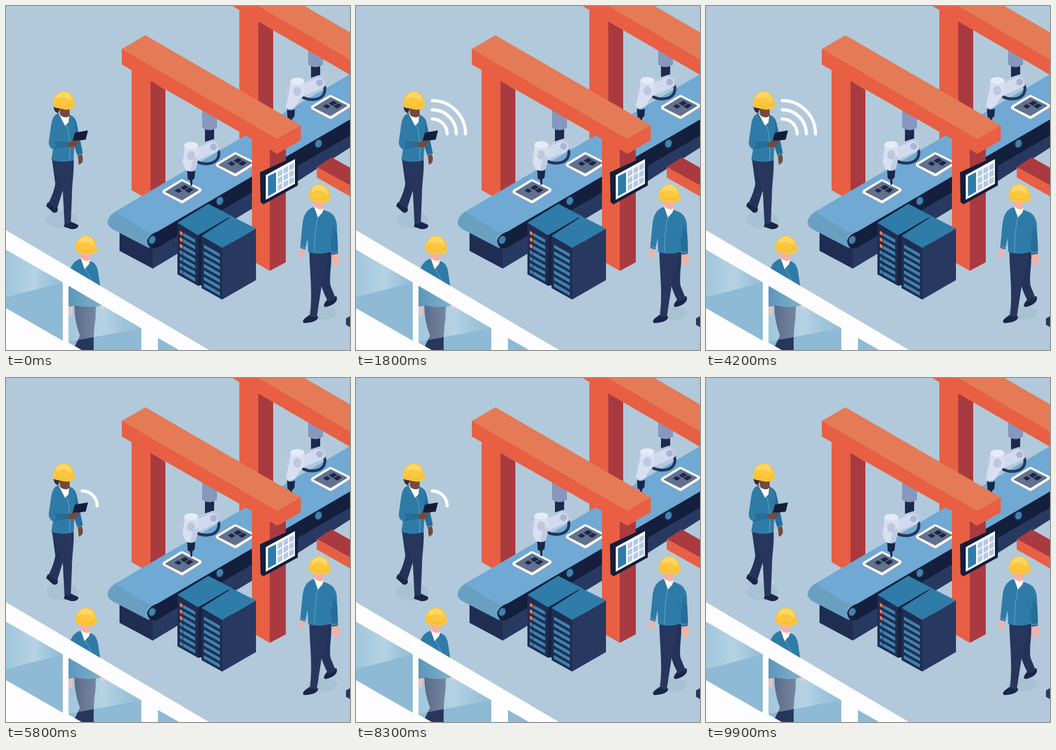
Animation of 600 by 600 pixels, one loop 10000 ms. Source, as an HTML page:

```html
<!DOCTYPE html>
<html lang="en">
<head>
<meta charset="utf-8">
<title>Smart factory</title>
<style>
  html, body { margin: 0; width: 100%; height: 100%; overflow: hidden; background: #b1c9da; }
  svg { display: block; width: 100vw; height: 100vh; }
</style>
</head>
<body>
<svg viewBox="0 0 600 600" xmlns="http://www.w3.org/2000/svg">
  <defs>
    <linearGradient id="shine">
      <stop offset="0" stop-color="#dcebf3" stop-opacity=".25"/>
      <stop offset=".5" stop-color="#dcebf3" stop-opacity=".5"/>
      <stop offset="1" stop-color="#a9cce0" stop-opacity=".2"/>
    </linearGradient>

    <g id="helmet">
      <path fill="#fdc63c" d="M528 333C528 318 537 311 547 311C558 311 564 319 564 328L567 336C563 342 553 344 546 342C540 340 533 341 528 337Z"/>
      <path fill="#ffd766" d="M532 325C535 315 541 312 548 312C557 313 561 321 560 329C554 322 544 319 532 325Z"/>
      <path fill="none" stroke="#f3b32f" stroke-width="1.2" d="M530 335Q538 335 546 338Q555 339 564 332"/>
    </g>

    <g id="head">
      <path fill="#fff" d="M537 349L554 352L552 360L544 369Z"/>
      <path fill="#f4b0a3" d="M536 337L554 339L554 352C551 356 543 356 537 349Z"/>
      <use href="#helmet"/>
    </g>

    <g id="board">
      <path fill="#8d9dbc" stroke="#8d9dbc" stroke-width="8" stroke-linejoin="round" d="M-30 2L0-16L30-1L0 18Z"/>
      <path fill="#f6f8fe" stroke="#f6f8fe" stroke-width="8" stroke-linejoin="round" d="M-30 0L0-18L30-3L0 16Z"/>
      <path fill="#61718f" stroke="#61718f" stroke-width="2" stroke-linejoin="round" d="M-28 0L0-17L28-3L0 14Z"/>
      <path fill="#1b2747" d="M-3-7L5-12L12-8L4-3ZM5-2L13-7L20-4L12 2ZM-13-2L-7-6L0-2L-6 2Z"/>
    </g>

    <g id="arm">
      <path fill="none" stroke="#25365c" stroke-width="5" stroke-linecap="round" d="M369 247C375 262 369 273 353 275Q343 276 334 272"/>
      <path fill="none" stroke="#bcc7e0" stroke-width="23" stroke-linecap="round" d="M312 261L363 244"/>
      <path fill="none" stroke="#d2daed" stroke-width="20" stroke-linecap="round" d="M323 263L360 247"/>
      <circle cx="362" cy="246" r="6" fill="#aab6d4"/>
    </g>

    <g id="joint">
      <path fill="#d8dff0" d="M311 243V252L308 274L313 286Q322 291 331 285L336 264L335 243Z"/>
      <path fill="#c3cce3" d="M326 267L336 262L331 285Q327 288 321 288Z"/>
    </g>

    <g id="cap">
      <ellipse cx="323" cy="243" rx="12" ry="6" fill="#e6ebf7"/>
      <ellipse cx="323" cy="261" rx="7" ry="8" fill="#bcc7e0"/>
    </g>

    <path id="gripper" fill="#1a2648" d="M316 287Q323 291 330 287L329 300L325 304V312L322 314L321 304L317 302Z"/>

    <g id="hanger">
      <path fill="#1d2a4e" d="M347 205H363V242H347Z"/>
      <path fill="#8698bd" d="M342 172H368V212Q355 221 342 212Z"/>
    </g>
  </defs>

  <rect width="600" height="600" fill="#b1c9da"/>

  <!-- rear gantry post -->
  <path fill="#e85f43" d="M407 0H440V240H407Z"/>
  <path fill="#a93a40" d="M440 20L466 35V240H440Z"/>

  <!-- front gantry, left post -->
  <path fill="#e85f43" d="M219 105L252 125V340L219 321Z"/>
  <path fill="#a93a40" d="M252 130L278 146V340H252Z"/>

  <!-- conveyor -->
  <path fill="#1f2d52" d="M198 392L256 424V458L198 427Z"/>
  <path fill="#273960" d="M256 418L600 215V247L508 306L256 458Z"/>
  <path fill="#141f3d" d="M262 394L600 197V226L263 422Q248 427 245 414Q246 400 262 394Z"/>
  <path fill="#69a0c2" d="M195 356Q178 365 177 378Q178 385 187 390L243 419Q247 422 252 422Q243 412 248 402Q254 396 265 393Z"/>
  <path fill="#70a9d3" d="M195 356L600 119V198L265 393Q252 397 242 391L192 360Z"/>
  <g id="wheels"></g>
  <use href="#board" x="307" y="324"/>
  <use href="#board" x="400" y="277"/>
  <use href="#board" x="566" y="177"/>

  <!-- robots -->
  <use href="#hanger" x="185" y="-110"/>
  <g id="rearArm">
    <use href="#gripper" x="174" y="-107"/>
    <g transform="translate(185 -112)">
      <use href="#arm"/>
      <path fill="#d8dff0" d="M311 243L310 256L303 288Q311 295 319 289L335 264V243Z"/>
      <use href="#cap"/>
    </g>
  </g>
  <use href="#hanger"/>
  <g id="frontArm">
    <use href="#gripper"/><use href="#arm"/><use href="#joint"/><use href="#cap"/>
  </g>

  <!-- rear gantry beam -->
  <path fill="#e85f43" d="M390-30L600 93V120L440 27L407 7L390-3Z"/>
  <path fill="#e57a56" d="M388-30L440-47L600 46V93L440 0Z"/>

  <!-- front gantry, beam and right post -->
  <path fill="#a93a40" d="M460 245L488 235V447L460 462Z"/>
  <path fill="#e85f43" d="M202 74L473 231L514 208V234L473 258L460 250V462L429 444V232L202 102Z"/>
  <path fill="#e57a56" d="M202 75L243 51L514 208L473 232Z"/>

  <!-- servers -->
  <path fill="#17223f" d="M334 399L395 367V452L334 488Z"/>
  <path fill="#1f2d52" d="M299 378L335 399V488L299 468Z"/>
  <path fill="#2f7ca9" d="M299 378L353 345L395 367L335 400Z"/>
  <path fill="#17223f" d="M335 400L388 369L395 371L341 402V487L335 488Z"/>
  <path fill="#273960" d="M377 422L436 388V478L377 512Z"/>
  <path fill="#1f2d52" d="M341 401L377 422V512L341 492Z"/>
  <path fill="#2f7ca9" d="M341 401L394 367L436 388L377 422Z"/>
  <g id="slots"></g>

  <!-- control panel -->
  <path fill="#141e3b" d="M443 290L504 262L509 264V313L449 346L444 342Z"/>
  <path fill="#f7faff" d="M453 295L504 267V310L453 338Z"/>
  <path fill="#2f7ca9" d="M457 297L471 290V324L457 332Z"/>
  <g id="tiles" fill="#b3c9e2"></g>

  <!-- right edge -->
  <path fill="#a93a40" d="M542 281L568 264L600 282V313Z"/>
  <path fill="#e85f43" d="M542 281L600 313V332L542 299Z"/>
  <path fill="#273960" d="M593 545L600 541V560L593 556Z"/>

  <!-- worker with tablet -->
  <ellipse cx="98" cy="373" rx="28" ry="15" fill="#a8c2d3"/>
  <path fill="#1a2547" d="M73 342L90 352C92 358 88 362 82 360L70 349ZM103 376L113 376L126 382C127 387 121 390 113 389L101 385Z"/>
  <path fill="#243359" d="M80 266H106L104 306Q97 328 89 354L74 344Q84 324 86 310Z"/>
  <path fill="#27365d" d="M80 266L118 268C119 290 115 310 115 330L113 378Q108 382 102 378L99 322Q90 300 80 266Z"/>
  <path fill="#75493d" d="M125 258L132 258Q136 268 132 274L127 277Z"/>
  <path fill="#276d99" d="M112 190Q122 194 124 208L134 257L125 262L114 230Z"/>
  <path fill="#2f7ba8" d="M91 187L112 190Q119 194 121 206L118 269Q98 275 79 268L82 250Q73 246 75 234L79 206Q81 191 91 187Z"/>
  <path fill="#276d99" d="M83 236L109 237L110 245L82 250Q92 244 83 236Z"/>
  <path fill="#fff" d="M92 188L110 192L109 203L103 209Z"/>
  <path fill="#3b2a33" d="M83 170L95 174L91 187Q82 185 83 170Z"/>
  <path fill="#75493d" d="M92 174L111 176L111 190Q107 198 95 191Z"/>
  <use href="#helmet" x="-446" y="-162"/>
  <path fill="none" stroke="#6aa9cb" d="M106 208Q113 230 111 270M125 260L134 257"/>
  <path fill="#141d38" d="M120 221L143 217L139 233L116 236Z"/>
  <path fill="#75493d" d="M108 238L122 234Q129 236 125 240L119 246L109 246Z"/>

  <g id="waves" fill="none" stroke="#fff" stroke-width="5.5" stroke-linecap="round"></g>

  <!-- worker on the right -->
  <ellipse cx="552" cy="535" rx="26" ry="12" fill="#a8c2d3"/>
  <path fill="#1a2547" d="M561 511L576 506C580 512 575 521 558 525C552 524 554 520 561 511ZM528 539L544 541C546 548 535 553 520 553C515 550 520 545 528 540Z"/>
  <path fill="#243359" d="M546 429H567C569 450 563 470 566 488L575 510L562 516C552 498 547 480 545 465Z"/>
  <path fill="#27365d" d="M529 428L563 430C560 455 552 475 549 498L542 543L530 541C535 500 530 470 529 428Z"/>
  <path fill="#f4b0a3" d="M513 421L521 424C520 432 518 438 515 439C511 435 511 428 513 421ZM570 432L579 432C582 440 581 448 577 453C572 452 571 446 567 444Z"/>
  <path fill="#2f7ba8" d="M535 351L558 357C570 361 575 368 577 380L579 432L568 434L567 428C555 433 540 433 527 429L526 405L522 425L513 422L517 382C519 364 524 356 535 351Z"/>
  <path fill="#276d99" d="M560 382L566 405L568 434L579 432L578 399L571 380L568 408Z"/>
  <path fill="none" stroke="#6aa9cb" d="M544 368Q538 394 538 430M514 419L523 422M568 430L579 429"/>
  <use href="#head"/>

  <!-- worker behind the railing -->
  <path fill="#8ebad5" d="M0 424L100 482V584L0 527ZM108 487L236 562V600H108ZM265 579L302 600H265Z"/>
  <path fill="#f4b0a3" d="M109 520H117L115 541L110 540ZM164 520L171 523V530L164 526Z"/>
  <path fill="#27365d" d="M119 518H157L156 545Q152 570 153 600H117L129 575Q119 550 119 518Z"/>
  <path fill="#2f7ba8" d="M129 441L150 446Q159 450 161 466L166 500L167 522L158 524Q138 527 119 522L116 524H108L110 470Q112 447 129 441Z"/>
  <path fill="none" stroke="#6aa9cb" d="M138 458Q150 475 152 495"/>
  <use href="#head" x="-407" y="90"/>
  <path fill="url(#shine)" d="M0 424L100 482L0 508Z"/>
  <path fill="url(#shine)" d="M108 487L236 562L108 586Z"/>
  <path fill="#fdfdff" fill-rule="evenodd" d="M0 391L354 600H302L265 579V600H236V562L109 488V587L132 600H0V527L99 584V482L0 425Z"/>
</svg>
<script>
  const byId = id => document.getElementById(id);

  const make = (parent, tag, attrs) => {
    const node = document.createElementNS('http://www.w3.org/2000/svg', tag);
    for (const key in attrs) node.setAttribute(key, attrs[key]);
    return byId(parent).appendChild(node);
  };

  // Parallelogram with vertical sides; slope tilts its long edges.
  const slab = (parent, x, y, w, h, slope, fill) => {
    const attrs = { d: `M${x} ${y}l${w} ${w * slope}v${h}l${-w} ${-w * slope}z` };
    if (fill) attrs.fill = fill;
    return make(parent, 'path', attrs);
  };

  for (const [cx, cy] of [[255, 408], [373, 340], [545, 240]]) {
    make('wheels', 'ellipse', {
      cx, cy, rx: 6.5, ry: 8, fill: '#3f83ae', stroke: '#17284c',
      'stroke-width': 2, transform: `rotate(24 ${cx} ${cy})`
    });
  }

  for (let row = 0; row < 7; row++) {
    const y = 392 + row * 11.2;
    slab('slots', 303, y, 5, 6, 0.57, row < 3 ? '#e57a56' : '#3e83ae');
    slab('slots', 309, y + 3.4, 21, 6, 0.57, '#3e83ae');
    slab('slots', 345, y + 24, 28, 6, 0.57, '#3e83ae');
  }

  for (let i = 0; i < 9; i++) {
    const col = i % 3, row = Math.floor(i / 3);
    slab('tiles', 474 + col * 10, 289 - col * 5.5 + row * 12, 8, 9.5, -0.55);
  }

  const LOOP = 10000, LIFT = 2000, SIGNAL = 2500;
  const waves = [26, 42, 58].map((r, i) => ({
    on: 500 * (i + 1),
    node: make('waves', 'path', { d: `M133 ${223 - r}A${r} ${r} 0 0 1 ${133 + r} 223` })
  }));

  function draw(t) {
    const lift = -6 * (1 - Math.cos(2 * Math.PI * t / LIFT));
    for (const id of ['frontArm', 'rearArm']) {
      byId(id).setAttribute('transform', `translate(0 ${lift.toFixed(2)})`);
    }
    const phase = t % SIGNAL;
    for (const { on, node } of waves) {
      node.style.display = phase >= on && phase < 2250 ? '' : 'none';
    }
  }

  const start = performance.now();
  function tick() {
    const elapsed = (performance.now() - start) % LOOP;
    draw(Math.floor(elapsed / 100) * 100);
    requestAnimationFrame(tick);
  }
  draw(0);
  requestAnimationFrame(tick);
</script>
</body>
</html>
```
